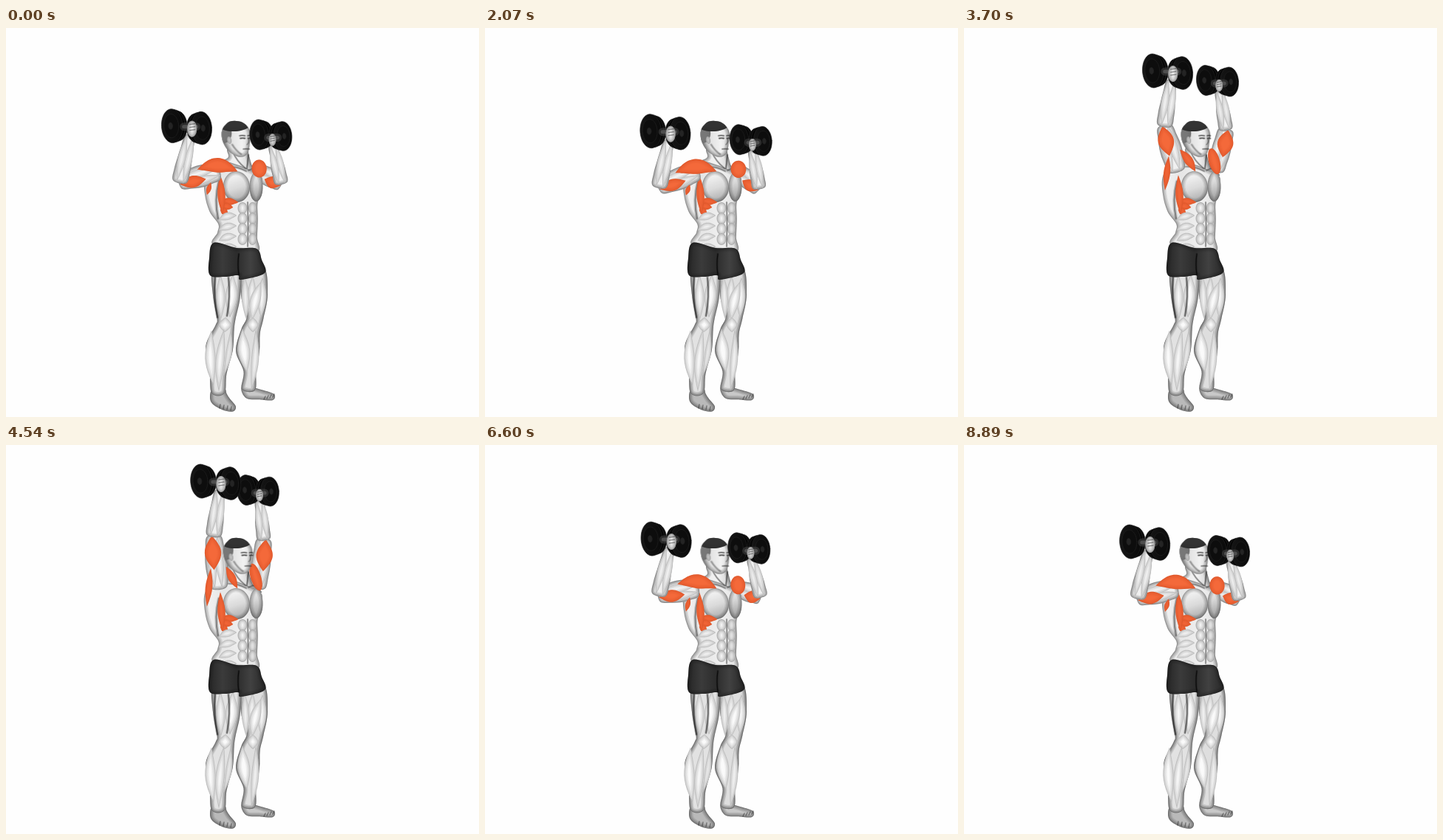
Recreate the animation shown at these times as an HTML page with a canvas. Size 640 by 527 pixels, loop 8980 ms.

```html
<!DOCTYPE html>
<html lang="en">
<head>
<meta charset="utf-8">
<title>Dumbbell shoulder press</title>
<style>
html, body { margin: 0; width: 100%; height: 100%; overflow: hidden; background: #fefefe; }
canvas { display: block; width: 100vw; height: 100vh; }
</style>
</head>
<body>
<canvas id="stage" width="640" height="527"></canvas>
<script>
const screen2d = document.getElementById('stage').getContext('2d');
let g = screen2d;
const LOOP = 8980, STEPS = 90, BOTTOM = 1070, HALF = 3355;

// ---- geometry ----
const mix = (a, b, f) => [a[0] + (b[0] - a[0]) * f, a[1] + (b[1] - a[1]) * f];

// unit direction and normal of a bone
function axis(a, b) {
  const len = Math.hypot(b[0] - a[0], b[1] - a[1]) || 1;
  const d = [(b[0] - a[0]) / len, (b[1] - a[1]) / len];
  return { d, n: [-d[1], d[0]], len };
}

// outline around a spine of [x, y, radius]
function tube(spine) {
  const a = [], b = [], last = spine.length - 1;
  spine.forEach(([x, y, r], i) => {
    const { n } = axis(spine[Math.max(0, i - 1)], spine[Math.min(last, i + 1)]);
    a.push([x + n[0] * r, y + n[1] * r]);
    b.unshift([x - n[0] * r, y - n[1] * r]);
  });
  return a.concat(b);
}

// straight bone with evenly spaced radii
const bone = (a, b, radii) =>
  tube(radii.map((r, i) => [...mix(a, b, i / (radii.length - 1)), r]));

// muscle belly: thin at the ends, optionally bent sideways
function belly(ax, ay, bx, by, r, bend = 0) {
  const a = [ax, ay], b = [bx, by], { n } = axis(a, b), spine = [];
  for (let i = 0; i <= 6; i++) {
    const s = Math.sin(Math.PI * i / 6), [x, y] = mix(a, b, i / 6);
    spine.push([x + n[0] * bend * s, y + n[1] * bend * s, r * s + .2]);
  }
  return tube(spine);
}

function ring(x, y, rx, ry, rot = 0) {
  const p = [], c = Math.cos(rot), s = Math.sin(rot);
  for (let i = 0; i < 12; i++) {
    const u = rx * Math.cos(i * Math.PI / 6), v = ry * Math.sin(i * Math.PI / 6);
    p.push([x + u * c - v * s, y + u * s + v * c]);
  }
  return p;
}

// ---- painting ----
function trace(p) {
  const n = p.length, at = i => p[(i + n) % n];
  g.beginPath();
  g.moveTo(...p[0]);
  for (let i = 0; i < n; i++) {
    const a = at(i - 1), b = at(i), c = at(i + 1), d = at(i + 2);
    g.bezierCurveTo(b[0] + (c[0] - a[0]) / 6, b[1] + (c[1] - a[1]) / 6,
      c[0] - (d[0] - b[0]) / 6, c[1] - (d[1] - b[1]) / 6, ...c);
  }
}

// fill, then darken softly towards the rim
function part(p, fill, rim = '25,25,25', k = 1) {
  trace(p);
  g.fillStyle = fill;
  g.fill();
  g.save();
  g.clip();
  for (let w = 2; w < 14; w += 3) {
    g.lineWidth = w;
    g.strokeStyle = `rgba(${rim},${k * .32 / Math.sqrt(w)})`;
    g.stroke();
  }
  g.restore();
}

function curve(ax, ay, bx, by, bend = 0, w = 1.2, a = .45, rgb = '30,30,30') {
  const { n } = axis([ax, ay], [bx, by]);
  g.beginPath();
  g.moveTo(ax, ay);
  g.quadraticCurveTo((ax + bx) / 2 + n[0] * bend * 2, (ay + by) / 2 + n[1] * bend * 2, bx, by);
  g.lineCap = 'round';
  for (const f of [1, 2.2]) {
    g.lineWidth = w * f;
    g.strokeStyle = `rgba(${rgb},${a / f})`;
    g.stroke();
  }
}

function grad(x0, y0, x1, y1, ...cols) {
  const q = g.createLinearGradient(x0, y0, x1, y1);
  cols.forEach((c, i) => q.addColorStop(i / (cols.length - 1), c));
  return q;
}

const SKIN = '#f0f0f0';
const muscle = (...b) => part(belly(...b), '#fafafa', '30,30,30', .5);
const red = p => part(p, '#f4693a', '165,45,10', .5);

// ---- fixed body ----
function legs() {
  // right leg and foot
  part(tube([[326, 484, 8], [330, 494, 9], [346, 497, 6.5], [362, 500, 4]]), '#c9c9c9');
  part(tube([[334, 325, 15], [336, 362, 18], [337, 392, 11.5], [331, 411, 13],
    [327, 438, 16], [330, 465, 8.5], [328, 490, 9]]), '#dedede', '15,15,15', 1.2);
  muscle(323, 336, 325, 394, 5);
  muscle(334, 336, 331, 378, 5);
  muscle(347, 338, 345, 392, 6);
  muscle(345, 344, 333, 396, 7, 2);
  muscle(334, 392, 334, 412, 7);
  muscle(320, 408, 326, 466, 8, 1);
  muscle(338, 408, 332, 490, 5, -2);

  // left leg and foot
  part(tube([[287, 488, 8], [288, 501, 12], [298, 510, 9], [309, 516, 4]]), '#b9b9b9');
  part(tube([[298, 325, 17], [298.5, 362, 18.5], [298, 394, 12.5], [296, 406, 13],
    [288.5, 434, 18.5], [287, 468, 11.5], [287, 495, 8.5]]), '#e2e2e2', '15,15,15', 1.2);
  muscle(290, 334, 291, 394, 6);
  muscle(307, 334, 303, 392, 8);
  muscle(297, 392, 296, 412, 8);
  muscle(278, 410, 281, 484, 7, 3);
  muscle(295, 408, 288, 492, 6, 2);
  muscle(304, 410, 295, 470, 4, -2);
  curve(283, 338, 286, 392, 2, 1.6, .6);
  curve(301, 338, 299, 390, -2, 1.6, .55);
  for (let i = 0; i < 4; i++) {
    curve(289 + i * 5, 515 + i, 290 + i * 5, 510 + i, 0, .8);
    curve(349 + i * 4, 503 - i, 351 + i * 4, 499 - i, 0, .8);
  }
}

function shorts() {
  const cut = [[281, 291], [275, 312], [276, 335], [296, 337], [314, 335],
    [318, 341], [350, 332], [346, 314], [339, 299], [312, 298]];
  part(cut, grad(274, 0, 350, 0, '#262626', '#3b3b3b', '#2c2c2c', '#414141', '#282828'), '0,0,0', .6);
  curve(315, 306, 315, 334, 1, 1.2, .6, '0,0,0');
}

function torso() {
  // neck runs out into the shoulder slope
  part(tube([[312, 160, 12], [315, 174, 14], [313, 184, 21], [311, 194, 33]]),
    grad(290, 0, 340, 0, '#e8e8e8', '#f4f4f4', '#bdbdbd'));
  part(tube([[314, 188, 28], [308, 206, 39], [307.5, 225, 38.5], [308, 243, 33],
    [314, 262, 27], [313, 280, 27], [310, 299, 29]]),
    grad(267, 0, 348, 0, '#f5f5f5', '#e6e6e6', '#f0f0f0', '#dcdcdc'), '20,20,20', .9);
  curve(288, 208, 287, 258, 3, 2, .4);
  curve(306, 166, 324, 190, 2, 1.3, .4);
  curve(328, 172, 326, 190, 0, 1.3, .5);
  curve(298, 188, 325, 194, -2, 1.2, .35);
  curve(328, 193, 346, 191, -2, 1.2, .35);
  // chest
  const chest = grad(305, 197, 318, 237, '#f6f6f6', '#dadada', '#a6a6a6');
  part(ring(338.5, 215, 9, 20), chest, '20,20,20', .8);
  part(ring(312, 215, 18, 21, -.1), chest, '20,20,20', .8);
  // side muscles
  for (let i = 0; i < 3; i++) red(belly(290, 234 + i * 6, 314 - i * 7, 236 + i * 7, 4.5));
  red(belly(290, 200, 293, 252, 5));
  // belly
  for (let i = 0; i < 4; i++) {
    const y = 244 + i * 14;
    muscle(288, y + 16, 312, y + 10, 5, -2);
    part(ring(320, y, 6.5, 8), '#f3f3f3', '30,30,30', .6);
    part(ring(333.5, y, 5.5, 8), '#ededed', '30,30,30', .6);
  }
  curve(327, 236, 327, 296, -.5, 1, .5);
}

function head() {
  const skull = tube([[312, 127, 8], [311.5, 137, 18], [313, 149, 19.5],
    [316, 160, 16], [320.5, 168, 10.5], [323, 173, 4]]);
  part(skull, grad(294, 0, 333, 0, '#a8a8a8', '#e4e4e4', '#f2f2f2', '#d8d8d8'), '20,20,20', .9);
  g.save();
  trace(skull);
  g.clip();
  part(ring(297, 144, 9, 12, .2), '#777777', '70,70,70', .3);
  part(ring(311, 130, 22, 10, -.08), '#333333', '40,40,40', .6);
  g.restore();
  part(ring(303, 152, 3, 5, -.2), '#d6d6d6', '30,30,30', .5);
  for (const [x, w] of [[317, 7], [328, 4]]) {
    curve(x, 146, x + w, 146, -.5, 1.2, .6);
    curve(x + 1, 149.5, x + w, 149.5, -.4, 1.3, .6);
  }
  curve(328, 149, 327, 158, -2, .9, .4);
  curve(322, 164, 330, 164, -.3, 1.1, .5);
  curve(307, 158, 319, 171, 1, 1.6, .3);
}

function sheet(draw) {
  const c = document.createElement('canvas');
  c.width = 640; c.height = 527;
  g = c.getContext('2d');
  draw();
  g = screen2d;
  return c;
}
const bodyPic = sheet(() => { legs(); torso(); shorts(); });
const headPic = sheet(head);

// ---- arms: joint paths through four heights ----
const HEIGHTS = [0, .25, .64, 1];
const LEFT = {
  side: -1, shoulder: [288, 194],
  elbow: [[240, 230], [235, 206], [244, 163], [281, 123]],
  hand: [[250, 161], [251, 135], [259, 92], [290, 54]],
  upper: [10, 14, 15, 13, 9], fore: [6, 8.5, 10, 11, 9],
  plates: [[-25, -5], [13, -2]], size: 23, grip: 1
};
const RIGHT = {
  side: 1, shoulder: [341, 194],
  elbow: [[365, 232], [373, 208], [370, 168], [349, 128]],
  hand: [[364, 175], [359, 150], [351, 110], [342, 69]],
  upper: [9, 12, 13, 12, 9], fore: [5.5, 7, 9, 9.5, 8],
  plates: [[-16, -8], [14, -6]], size: 20.5, grip: .75
};

function along(keys, h) {
  let i = 0;
  while (i < 2 && h > HEIGHTS[i + 1]) i++;
  const f = (h - HEIGHTS[i]) / (HEIGHTS[i + 1] - HEIGHTS[i]);
  const p = keys[Math.max(0, i - 1)], q = keys[i], r = keys[i + 1], s = keys[Math.min(3, i + 2)];
  return [0, 1].map(k => q[k] + .5 * f * (r[k] - p[k] +
    f * (2 * p[k] - 5 * q[k] + 4 * r[k] - s[k] + f * (3 * (q[k] - r[k]) + s[k] - p[k]))));
}

// light bellies along a bone
function sinews(a, b, r) {
  const { n } = axis(a, b);
  for (const o of [-.5, .4]) {
    const k = o * r;
    muscle(a[0] + n[0] * k, a[1] + n[1] * k, b[0] + n[0] * k, b[1] + n[1] * k, r * .5);
  }
}

function upperArm(arm, h) {
  const el = along(arm.elbow, h), sh = arm.shoulder, { n } = axis(sh, el);
  part(bone(sh, el, arm.upper), SKIN, '20,20,20', 1);
  sinews(sh, el, 11);
  const off = arm.side * (6 - 2 * h), from = mix(sh, el, .36);
  red(belly(from[0] + n[0] * off, from[1] + n[1] * off,
    el[0] + n[0] * off * .6, el[1] + n[1] * off * .6, 7 + 4 * h));
}

function foreArm(arm, h) {
  const el = along(arm.elbow, h), hd = along(arm.hand, h), wrist = mix(hd, el, .12);
  part(bone(wrist, el, arm.fore), SKIN, '20,20,20', 1);
  sinews(wrist, el, arm.fore[2]);
}

// dir: side on which the second disc sits
function weight(x, y, ry, dir) {
  const disc = (dx, k, fill) => {
    trace(ring(x + dir * dx, y, ry * .62 * k, ry * k, -.06));
    g.fillStyle = fill;
    g.fill();
    g.lineWidth = .7;
    g.strokeStyle = '#222';
    g.stroke();
  };
  disc(7, .88, '#0a0a0a');
  disc(3, .95, '#060606');
  disc(-1, 1, grad(x - ry, y, x + ry, y, '#191919', '#060606'));
  disc(-2, .7, '#0d0d0d');
  disc(-3, .2, '#242424');
}

function dumbbell(arm, h) {
  const [x, y] = along(arm.hand, h), [a, b] = arm.plates, s = arm.grip;
  weight(x + a[0], y + a[1], arm.size, 1);
  weight(x + b[0], y + b[1], arm.size * .97, -1);
  curve(x + a[0] + 15 * s, y - 4, x + b[0] - 6, y - 4, 0, 5, 1, '80,80,80');
  part(ring(x + 1, y - 1, 6.5 * s, 11 * s), '#f0f0f0', '20,20,20', .8);
  for (let i = 0; i < 3; i++) {
    const v = y + (i * 4 - 7) * s;
    curve(x - 2 * s, v, x + 5 * s, v - 1, 0, .8);
  }
}

function draw(h) {
  g.fillStyle = '#fefefe';
  g.fillRect(0, 0, 640, 527);

  upperArm(RIGHT, h);
  foreArm(RIGHT, h);
  g.drawImage(bodyPic, 0, 0);
  red(ring(344 - 6 * h, 194 - 15 * h, 11 - 4 * h, 10 + 9 * h, -.3 * h));

  upperArm(LEFT, h);
  red(belly(272, 228 - 10 * h, 277, 222 - 54 * h, 2.5 + 2 * h));
  foreArm(LEFT, h);
  // shoulder cap narrows as the arm goes up
  const cap = along([[257, 207], [260, 190], [276, 167], [298, 165]], h);
  red(belly(...cap, 313, 194, 11 - 6 * h, 9 * (h - 1)));
  g.drawImage(headPic, 3 * h - 1.5, 0);

  dumbbell(RIGHT, h);
  dumbbell(LEFT, h);
}

// ---- timing: one smooth swing, held in even steps ----
const lift = t => (1 - Math.cos(Math.PI * (t - BOTTOM) / HALF)) / 2;

const start = performance.now();
let shown = -1;
function tick() {
  const step = Math.floor((performance.now() - start) % LOOP / LOOP * STEPS);
  if (step !== shown) draw(lift(step * LOOP / STEPS));
  shown = step;
  requestAnimationFrame(tick);
}
tick();
</script>
</body>
</html>
```
